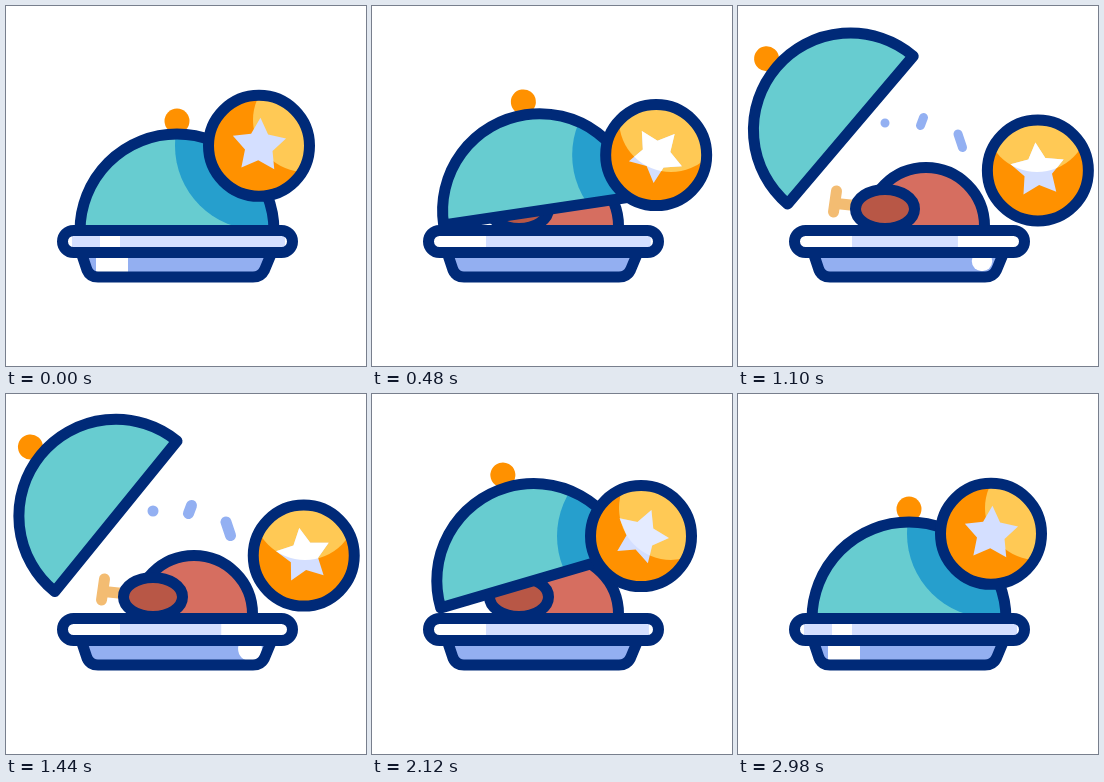
An HTML page that plays this animation: 360x360 px, repeating every 3 s.

```html
<!DOCTYPE html>
<html lang="en">
<head>
<meta charset="utf-8">
<title>Star dish</title>
<style>
  html, body { margin: 0; width: 100%; height: 100%; overflow: hidden; background: #fff; }
  svg { display: block; width: 100vw; height: 100vh; }
  .line { stroke: #002a78; stroke-width: 11; stroke-linejoin: round; stroke-linecap: round; }
  .lav { fill: #d4dfff; }
  .bone { fill: none; stroke: #f3bc72; stroke-width: 11; stroke-linecap: round; }
  #sparks { fill: none; stroke: #93b0f2; stroke-linecap: round; }
</style>
</head>
<body>
<svg viewBox="0 0 360 360">
  <defs>
    <path id="dome" d="M74 225A97 97 0 0 1 268 225Z"/>
    <path id="base" d="M75 246L81 264Q84 271 92 271H247Q255 271 258.500 264L266 246Z"/>
    <path id="star"/>
    <clipPath id="domeClip"><use id="domeMask" href="#dome"/></clipPath>
    <clipPath id="baseClip"><use href="#base"/></clipPath>
    <clipPath id="plateClip"><rect x="60" y="228" width="223" height="15" rx="7.5"/></clipPath>
    <clipPath id="badgeClip"><circle id="badgeMask" r="47"/></clipPath>
    <clipPath id="shineClip"><circle cx="299" cy="114" r="52"/></clipPath>
  </defs>

  <path class="bone" d="M98.500 185L95.500 206M98 197.500L122 200"/>
  <path class="line" d="M129.500 225V220A58.500 58.500 0 0 1 246.500 220V225Z" fill="#d66e60"/>
  <ellipse class="line" cx="147" cy="203" rx="29.500" ry="19.500" fill="#b85746"/>

  <path id="sparks" d="M147 117h.01M185.500 111.500l-3 8M220 128l4.500 13.500"/>

  <circle id="knob" cx="171" cy="115" r="12.500" fill="#ff9100"/>
  <use id="domeFill" href="#dome" fill="#67ccd0"/>
  <g clip-path="url(#domeClip)"><circle id="shade" r="84" fill="#269fcd"/></g>
  <use id="domeLine" href="#dome" class="line" fill="none"/>

  <use href="#base" fill="#93aff1"/>
  <g clip-path="url(#baseClip)" fill="#fff">
    <rect id="gleam" x="90" y="245" width="32" height="30"/>
    <circle id="glint" cx="244" cy="255"/>
  </g>
  <use href="#base" class="line" fill="none"/>
  <rect x="56.500" y="224.500" width="230" height="22" rx="11" fill="#fff"/>
  <g clip-path="url(#plateClip)" class="lav">
    <rect id="tint" x="114" y="228" height="15"/>
    <rect id="tintLeft" x="66" y="228" width="28" height="15"/>
  </g>
  <rect class="line" x="56.500" y="224.500" width="230" height="22" rx="11" fill="none"/>

  <circle id="disc" r="50" fill="#ff9100"/>
  <g clip-path="url(#badgeClip)"><circle cx="299" cy="114" r="52" fill="#ffc955"/></g>
  <use id="starBase" href="#star" class="lav"/>
  <g clip-path="url(#shineClip)"><use id="starLit" href="#star" fill="#fff"/></g>
  <circle id="ring" class="line" r="50.500" fill="none"/>
</svg>
<script>
const LOOP = 3000;
const el = id => document.getElementById(id);
const clamp = v => Math.min(1, Math.max(0, v));
const set = (ids, attrs) => {
  for (const id of ids.split(' '))
    for (const k in attrs) el(id).setAttribute(k, attrs[k]);
};

const ease = u => u < 0.5 ? 4 * u ** 3 : 1 - 4 * (1 - u) ** 3;
// Eases 0 to 1 from start to peak, then back to 0 at end
const swell = (t, start, peak, end) =>
  ease(clamp(t < peak ? (t - start) / (peak - start) : (end - t) / (end - peak)));

const starPoints = Array.from({ length: 10 }, (_, i) => {
  const r = i % 2 ? 14.5 : 28, a = i * Math.PI / 5;
  return `${r * Math.sin(a)} ${-r * Math.cos(a)}`;
});
set('star', { d: `M${starPoints.join('L')}Z` });

function draw(t) {
  const open = swell(t, 20, 1350, 2705);
  set('knob domeFill domeLine domeMask', { transform: `rotate(${-51 * open} 32.6 237.8)` });

  // The badge swings on an arc and spins slightly faster than it swings
  const swing = 55.8 * swell(t, 0, 900, 3000), rad = swing * Math.PI / 180;
  const cx = 253 + 56.8 * Math.sin(rad), cy = 196.6 - 56.8 * Math.cos(rad);
  set('disc ring badgeMask shade', { cx, cy });
  set('starBase starLit', { transform: `translate(${cx} ${cy}) rotate(${3 + 1.15 * swing})` });
  set('starLit', { opacity: clamp((swing - 12) / 12) });

  // Reflections on the tray follow the lid
  set('tint', { width: 165 - 64 * open ** 3 });
  set('tintLeft gleam', { opacity: open < 0.1 ? 1 : 0 });
  set('glint', { r: 12 * open ** 6 });
  set('sparks', { 'stroke-width': 11 * clamp((open - 0.9) / 0.09) });
}

const start = performance.now();
function tick() {
  draw((performance.now() - start) % LOOP);
  requestAnimationFrame(tick);
}
tick();
</script>
</body>
</html>
```
